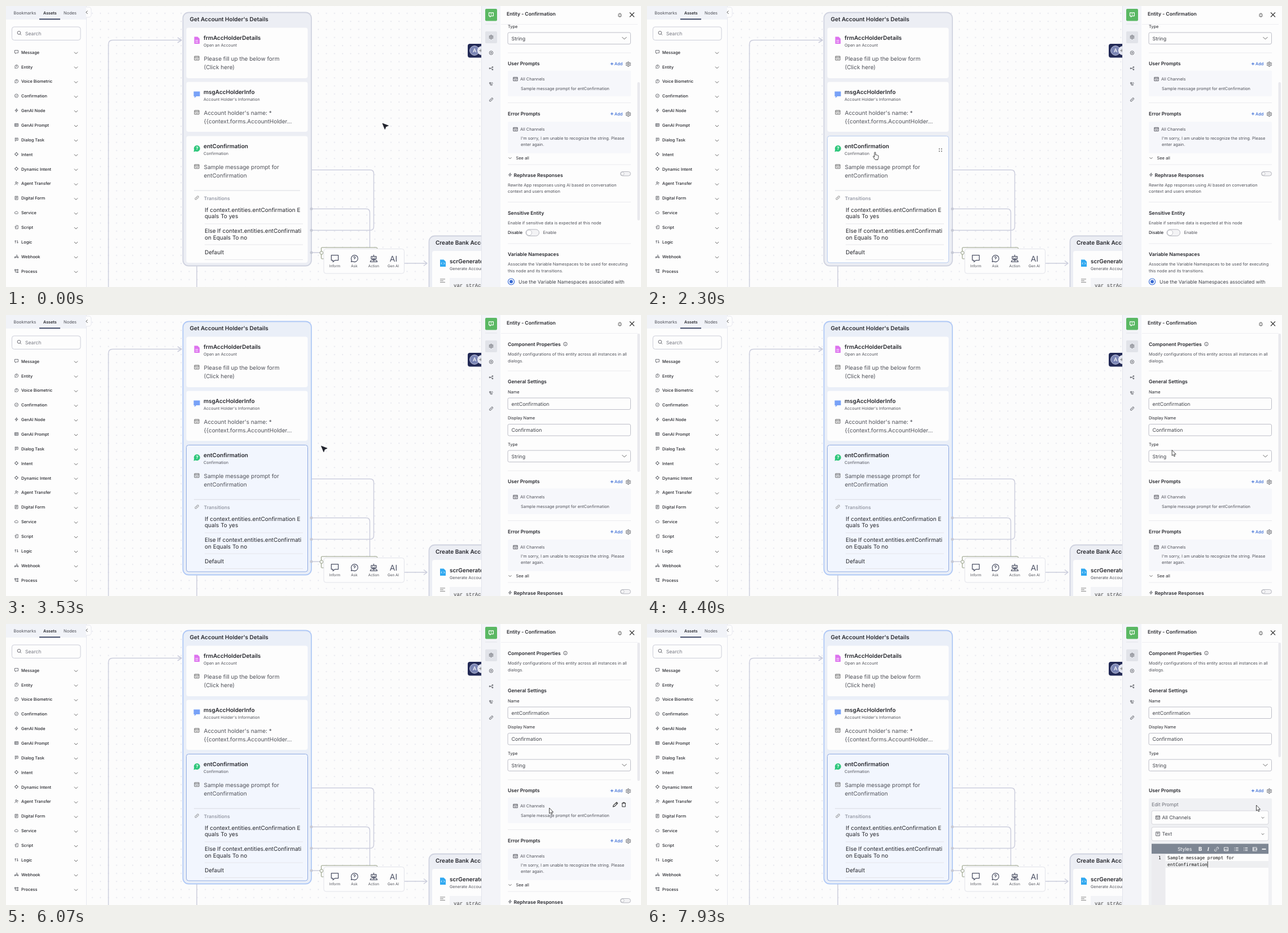
These frames come from a looping animation (1125 by 498 pixels, 8 s). An HTML page:

```html
<!DOCTYPE html>
<html lang="en">
<head>
<meta charset="utf-8">
<title>Entity confirmation</title>
<style>
html, body { margin: 0; width: 100%; height: 100%; overflow: hidden; background: #fdfdfd; }
svg { display: block; width: 100%; height: 100%; font-family: Inter, sans-serif; }
text { white-space: pre; text-rendering: geometricPrecision; }
</style>
</head>
<body>
<svg id="stage" viewBox="0 0 1125 498"></svg>
<script>
const INK = '#26272d', BODY = '#50525a', LINE = '#cccedd', BLUE = '#3568d4';

// Drawing helpers; text is placed by the middle of its capitals.
const text = (x, y, s, size = 7.4, weight = 400, fill = BODY, more = '') =>
  `<text x="${x}" y="${y + size * .36}" font-size="${size}" font-weight="${weight}" fill="${fill}" ${more}>${s}</text>`;
const rect = (x, y, w, h, fill, stroke = 'none', r = 0, more = '') =>
  `<rect x="${x}" y="${y}" width="${w}" height="${h}" rx="${r}" fill="${fill}" stroke="${stroke}" ${more}/>`;
const path = (d, stroke = INK, width = 1, fill = 'none', more = '') =>
  `<path d="${d}" stroke="${stroke}" stroke-width="${width}" fill="${fill}" stroke-linejoin="round" ${more}/>`;
const circle = (x, y, r, fill, stroke = 'none', width = 1) =>
  `<circle cx="${x}" cy="${y}" r="${r}" fill="${fill}" stroke="${stroke}" stroke-width="${width}"/>`;
const group = (x, y, inner, more = '') => `<g transform="translate(${x} ${y})" ${more}>${inner}</g>`;
const icon = (cx, cy, d, scale = 1, stroke = '#484a52', width = .85) =>
  `<g transform="translate(${cx - 4 * scale} ${cy - 4 * scale}) scale(${scale})">${path(d, stroke, width)}</g>`;
const chevron = (x, y, w = 3, color = '#555') => path(`M${x - w} ${y - w / 2}l${w} ${w} ${w} ${-w}`, color, .9);
const rule = (x, y, w, color = '#e2e2e7') => path(`M${x} ${y}h${w}`, color, .9);

// Icons in an 8 by 8 box
const I = {
  bubble: 'M.6.8h6.8v5H4L2.2 7.4V5.8H.6z',
  ask: 'M1 7.3l.4-1.7A3.3 3.3 0 1 1 2.7 6.9zM3.2 3a.9.9 0 1 1 .9 1v.7',
  check: 'M4 .6a3.4 3.4 0 1 1 0 6.8a3.4 3.4 0 0 1 0-6.8zM2.5 4l1 1 2-2',
  bolt: 'M4.6.5L1.2 4.5h2.6L3.4 7.5 6.8 3.5H4.2z',
  grid: 'M.6 1.2h6.8v5.6H.6zM.6 4h6.8M3 1.2v5.6M5 2.5h1M5 5.4h1',
  task: 'M1 1h6v4.6H3.6L1.6 7.2V1M3 2.6h2.5M3 4h1.6',
  target: 'M4 1.4a2.6 2.6 0 1 1 0 5.2a2.6 2.6 0 0 1 0-5.2zM4 0v2.2M4 5.8V8M0 4h2.2M5.8 4H8',
  gear: 'M4 2.7a1.3 1.3 0 1 1 0 2.6a1.3 1.3 0 0 1 0-2.6zM3.3.5h1.4l.3 1 1 .5 1-.3.7 1.2-.7.8v.8l.7.8-.7 1.2-1-.3-1 .5-.3 1H3.3L3 6.7l-1-.5-1 .3-.7-1.2.7-.8v-.8L.3 2.900 1 1.700l1 .3 1-.5z',
  person: 'M3.5.8a1.5 1.5 0 1 1 0 3a1.500 1.500 0 0 1 0-3zM.8 7.200c0-3 5-3 5.400 0M5.500 3.200h2M6.600 2.200v2',
  form: 'M1.200.7h5.600v6.600H1.200zM2.500 2.500h3M2.500 4h3M2.500 5.500h1.500',
  cloud: 'M2.200 6.300a1.800 1.800 0 0 1 0-3.600A2.200 2.200 0 0 1 6 3a1.700 1.700 0 0 1 0 3.300z',
  script: 'M2.500.8h4.500v6.400H2V5M.5 3.500h3M2.500 2l1.500 1.500L2.500 5',
  logic: 'M2 7V2M.7 3.300L2 1.500l1.300 1.800M4.500 2h1.700v4.500M4.800 5.200l1.400 1.500 1.300-1.500',
  hook: 'M4 .8a1.300 1.300 0 1 1-.1 2.700L2 6.200M4.600 3l1.600 2.600M.8 5.800h6.400M2 4.600A1.400 1.400 0 1 0 2 7.300M6 4.600a1.400 1.400 0 1 1 0 2.700',
  flow: 'M.7 1h2v2h-2zM5.300 1h2v2h-2zM5.300 5.300h2v2h-2zM2.700 2h2.600M1.700 3v3.300h3.600',
  plus: 'M4 .6a3.400 3.400 0 1 1 0 6.800a3.400 3.400 0 0 1 0-6.800zM4 2.500v3M2.500 4h3',
  share: 'M.6 3.200h1.600v1.600H.6zM5.800 1h1.600v1.600H5.800zM5.800 5.400h1.600V7H5.800zM2.200 4h1.500M5.800 1.800L3.700 4l2.100 2.200',
  loop: 'M1 1.500h2.500v2H1zM4.800 4.300a1.300 1.300 0 1 1 0 2.600a1.300 1.300 0 0 1 0-2.600zM5 1.500c2 0 2 1 1.700 2.200M2 4.500c0 1.500.4 1.800 1.500 1.600',
  plug: 'M2 6L.8 7.200M6 2L7.200.8M2.300 3.300l2.400 2.400-1 1a1.700 1.700 0 0 1-2.400-2.400zM3.400 2.300l1-1a1.700 1.700 0 0 1 2.400 2.400l-1 1z',
  prompt: 'M.5 1h7v6h-7zM.5 2.800h7M2 4.700h1l.6.7h1l.5-.7h1',
  info: 'M4 .8a3.200 3.200 0 1 1 0 6.400a3.200 3.200 0 0 1 0-6.400zM4 3.500v2M4 2.300v.5',
  search: 'M3.500.7a2.800 2.800 0 1 1 0 5.600a2.800 2.800 0 0 1 0-5.600zM5.500 5.500l2 2',
  bot: 'M1.500 2.200h5v2.300h-5zM4 2.200V.5M2.700 3.300h.6M4.800 3.300h.6M.6 7.600c0-3 6.800-3 6.800 0zM3 5.500l1 1 1-1',
  text: 'M.7.700h6.600v6.600H.7zM2.300 2.500h3.400M4 2.500v3.500',
  pencil: 'M.6 7.400l.6-2.200L6 .5l1.500 1.500-4.700 4.800zM5 1.500L6.500 3',
  trash: 'M.8 1.800h6.400M2.700 1.700V.6h2.600v1.100M1.500 1.800v5.700h5V1.800',
  link: 'M3 5l2-2M3.500 2l1-1a1.700 1.700 0 0 1 2.500 2.500l-1 1M4.500 6l-1 1A1.700 1.700 0 0 1 1 4.500l1-1',
  image: 'M.5 1h7v6h-7zM.7 6.500l2-2.500 1.500 1.500 1.200-1 2 2M5.500 2.700h.5',
  list: 'M3 1.500h4.700M3 4h4.700M3 6.500h4.700M.6 1.500h1M.6 4h1M.6 6.500h1',
  indent: 'M.5 1h7M.5 7h7M.5 3h3M.5 5h3M7.500 2.500L5 4l2.500 1.500zM.5.5v7'
};

const handle = Array.from({ length: 4 }, (_, i) =>
  rect(517 + i % 2 * 4, 252.500 + (i >> 1) * 4, 1.700, 1.700, '#666')).join('');

function sidebar() {
  const items = [['Message', 'bubble'], ['Entity', 'ask'], ['Voice Biometric', 'ask'], ['Confirmation', 'check'],
    ['GenAI Node', 'bolt'], ['GenAI Prompt', 'grid'], ['Dialog Task', 'task'], ['Intent', 'target'],
    ['Dynamic Intent', 'target'], ['Agent Transfer', 'person'], ['Digital Form', 'form'], ['Service', 'cloud'],
    ['Script', 'script'], ['Logic', 'logic'], ['Webhook', 'hook'], ['Process', 'flow']];
  return rect(0, 0, 142, 498, '#fdfdfd') + rect(0, 0, 142, 24, '#f1f3f8') + path('M142.500 0V498', '#e7e8ef') +
    path('M142 2h4q5 0 5 5v8q0 5-5 5h-4', '#e7e8ef', 1, '#fdfdfd') +
    path('M144.500 8.500l-2.700 2.700 2.700 2.700', '#555') +
    text(13.500, 12, 'Bookmarks', 7.500) + text(66, 12, 'Assets', 7.200, 600, INK) + text(102, 12, 'Nodes', 7.500) +
    rect(59, 22.500, 37, 1.700, '#253052') +
    rect(10.500, 37, 121.500, 23.500, '#fdfdfd', '#cbcdd8', 4) +
    icon(23.500, 48, I.search) + text(34, 48.500, 'Search', 8.600, 400, '#777983') +
    items.map(([name, key], i) => {
      const y = 82 + i * 25.870;
      return icon(18.500, y - .5, I[key], .9) + text(27, y, name, 7.400, 500, INK) + chevron(124, y + 1.200);
    }).join('');
}

function node() {
  const head = (y, name, sub) => text(350, y, name, 10, 600, INK) + text(350, y + 13.300, sub, 7.200);
  const lines = (y, a, b) => icon(338, y - .5, I.prompt, 1.150, '#666') +
    text(350.500, y, a, 10) + text(350.500, y + 15, b, 10);
  const cond = (y, a, b) => text(352, y, a, 10, 400, INK) + text(352, y + 11.500, b, 10, 400, INK);
  return rect(313.500, 11.500, 227.500, 449, '#eceef4', '#d0d3e0', 10, 'id="shell" stroke-width="1.800"') +
    text(325.500, 23.500, "Get Account Holder's Details", 10, 600, INK) +
    rect(319.500, 38.500, 215, 89.500, '#fdfdfd', 'none', 4) + rect(319.500, 134.500, 215, 88.500, '#fdfdfd', 'none', 4) +
    rect(319.500, 230.500, 215, 224.500, '#fdfdfd', 'none', 4, 'id="card"') +
    head(56.500, 'frmAccHolderDetails', 'Open an Account') +
    path('M333.500 54.500h6l3.500 3.500v9h-9.500z', 'none', 1, '#dd72ee') + path('M335.500 61h5M335.500 64h5', '#fff') +
    lines(93, 'Please fill up the below form', '(Click here)') +
    head(152.500, 'msgAccHolderInfo', "Account Holder's Information") +
    path('M332.500 151.500h11v8.500h-6.500l-3 3v-3h-1.500z', 'none', 1, '#78a2f7') +
    lines(189, "Account holder's name: *", '{{context.forms.AccountHolder...') +
    head(248, 'entConfirmation', 'Confirmation') +
    path('M338.500 247a5.500 5.500 0 1 1-2.500 10.500l-3.500 1 .8-4A5.500 5.500 0 0 1 338.500 247z', 'none', 1, '#2fc77c') +
    text(336.300, 252.600, '?', 8, 700, '#fff') +
    lines(285, 'Sample message prompt for', 'entConfirmation') +
    rule(333, 327, 188, '#d5d6dd') + icon(338, 340, I.plug, 1, '#777') +
    text(350.500, 340.500, 'Transitions', 8.600, 600, '#969aa6') +
    cond(361, 'If context.entities.entConfirmation E', 'quals To yes') + rule(352, 386, 174) +
    cond(398.500, 'Else If context.entities.entConfirmati', 'on Equals To no') + rule(352, 423, 174) +
    text(352, 436.500, 'Default', 10, 400, INK) + rule(352, 449.500, 174) +
    `<g id="handle">${handle}</g>`;
}

function canvas() {
  const tool = (x, name, art) => art + text(x, 461, name, 6.400, 400, BODY, 'text-anchor="middle"');
  const wire = d => path(d, LINE, 1.500);
  return rect(142, 0, 700, 498, '#fcfcfc') + rect(142, 0, 700, 498, 'url(#dots)') +
    wire('M181.500 498V68q0-7.500 7.500-7.500H311M304 56l7 4.500-7 4.500') + wire('M338 460V498') +
    wire('M541 290.500H645q6.500 0 6.500 6.500V391q0 6.500-6.500 6.500H541') +
    wire('M541 359.500H638q6.500 0 6.500 6.500V430') + wire('M541 437H557') +
    wire('M706 456H746M740 451.500l6 4.500-6 4.500') + node() +
    [359.500, 397.500, 437].map(y => circle(541, y, 2.500, '#c6c9d5')).join('') +
    rect(558.500, 428, 99, 20, '#fdfdfd', '#8f997e', 1) + circle(559, 437.500, 2.800, '#fff', '#8f997e') +
    rect(563, 430.500, 142.500, 43.500, '#fdfdfd', '#e2e3ea', 4) +
    tool(582.500, 'Inform', icon(582.500, 447.500, I.bubble, 1.800, '#4c5165', .7)) +
    tool(617, 'Ask', icon(617, 447.500, I.ask, 1.800, '#4c5165', .7)) +
    tool(651.500, 'Action', icon(651.500, 447, I.bot, 1.800, '#4c5165', .7)) +
    tool(686, 'Gen AI', text(686.500, 447.500, 'AI', 14, 400, '#4c5165', 'text-anchor="middle"')) +
    rect(749.500, 407.500, 150, 120, '#eceef4', '#d0d3e0', 10, 'stroke-width="1.800"') +
    text(761, 419.500, 'Create Bank Account', 10, 600, INK) + rect(755, 434, 140, 90, '#fdfdfd', 'none', 4) +
    path('M769 449.500h6.500l3.500 3.500v9h-10z', 'none', 1, '#2fa8f0') +
    path('M772.500 454.500l-1.500 1.700 1.500 1.700M775.500 454.500l1.500 1.700-1.500 1.700', '#fff', .9) +
    text(786, 452.500, 'scrGenerateAccount', 10, 600, INK) + text(786, 465, 'Generate Account', 7.200) +
    path('M769 484h9M769 486.800h6M769 489.600h9', '#777', .9) +
    rect(786, 482, 100, 30, '#f3f4f7') +
    text(793, 495, 'var strAcc', 9, 400, '#444', 'font-family="Liberation Mono, monospace"') +
    rect(818, 67, 40, 24.500, '#232a56', 'none', 4) + circle(830, 79, 8.300, '#7c86b5', '#c6cbe4') +
    text(827, 79, 'A', 9, 500, '#fff') + circle(843, 79, 8, '#e6e8f2') + path('M838 79h5M841 76.500v5', '#777');
}

const SEP = y => rule(889, y, 218, '#e8e8ed');
const title = (y, s, x = 889) => text(x, y, s, 8.600, 600, INK);
const toggle = (x, y, w, h) => rect(x, y, w, h, '#f3f3f5', '#b5b6be', h / 2) + circle(x + h / 2, y + h / 2, h / 2 - 1, '#fff', '#b5b6be', .8);
const channel = y => icon(902.500, y, I.prompt, 1.050) + text(911, y + .3, 'All Channels', 7.400);
const promptHead = (y, s) => title(y, s) + path(`M1071 ${y + .5}h5M1073.500 ${y - 2}v5`, BLUE) +
  text(1078, y + .5, 'Add', 7.400, 500, BLUE) + icon(1102.500, y + 1, I.gear, 1.100);

function fields() {
  const field = (y, label, value) => text(889, y, label, 7.400, 400, INK) +
    rect(889, y + 11, 217.500, 20.500, '#fdfdfd', '#bdbec8', 2.500) + text(895.500, y + 21.500, value, 8.800, 400, '#3f4148');
  return title(52, 'Component Properties') + icon(991, 51.500, I.info) +
    text(889, 69.500, 'Modify configurations of this entity across all instances in all') + text(889, 81, 'dialogs.') +
    SEP(99) + title(118, 'General Settings') + field(136, 'Name', 'entConfirmation') +
    field(182.500, 'Display Name', 'Confirmation') + field(229, 'Type', 'String') + chevron(1095.500, 250, 4) +
    SEP(276) + promptHead(295, 'User Prompts');
}

function prompts() {
  return rect(889, 307.500, 218, 45.500, '#f6f7fb', 'none', 2) + channel(322.500) +
    text(912, 339, 'Sample message prompt for entConfirmation') +
    `<g id="tools">${icon(1079.500, 320, I.pencil, 1.200, '#222')}${icon(1094.500, 320, I.trash, 1.100, '#222')}</g>` +
    SEP(364.500) + promptHead(383.500, 'Error Prompts') +
    rect(889, 398, 218, 56, '#f6f7fb', 'none', 2) + channel(411.500) +
    text(912, 427.500, "I'm sorry, I am unable to recognize the string. Please") + text(912, 438.500, 'enter again.') +
    chevron(893, 462.500, 2.500) + text(903.500, 462.500, 'See all', 7.400, 400, INK) + SEP(474) +
    icon(893, 492, I.bolt, .9) + title(492.500, 'Rephrase Responses', 899.500) + toggle(1088.500, 486.500, 18, 7.500) +
    text(889, 510, 'Rewrite App responses using AI based on conversation') + text(889, 521, 'context and users emotion') +
    SEP(540.500) + title(559.500, 'Sensitive Entity') + text(889, 577, 'Enable if sensitive data is expected at this node') +
    text(889, 594.500, 'Disable', 7.400, 500, INK) + toggle(921, 589, 23.500, 11.500) + text(951.500, 594.500, 'Enable') +
    SEP(614) + title(633, 'Variable Namespaces') +
    text(889, 650.500, 'Associate the Variable Namespaces to be used for executing') + text(889, 662, 'this node and its transitions.') +
    circle(895, 681.500, 5.500, '#fff', BLUE, 1.200) + circle(895, 681.500, 3, BLUE) +
    text(908, 681.500, 'Use the Variable Namespaces associated with', 8.600, 400, '#3f4148');
}

function editor() {
  const select = (y, key, s) => rect(894, y - 12, 207, 24, '#fdfdfd', '#d5d6dc', 3) +
    icon(905, y, I[key], 1) + text(912.500, y, s, 8.700, 400, '#3f4148') + chevron(1091, y + .3, 2.300);
  const code = (x, y, s) => text(x, y, s, 7.850, 400, '#111', 'font-family="DejaVu Sans Mono, monospace"');
  const bar = [['link', 1009], ['image', 1026], ['list', 1044], ['list', 1060.500], ['indent', 1077]];
  return rect(889, 309, 218, 200, '#f0f1f4', 'none', 2) + text(894, 319.500, 'Edit Prompt', 8.700, 400, '#6a6c75') +
    select(343, 'prompt', 'All Channels') + select(372, 'text', 'Text') +
    rect(894, 389.500, 207, 18, '#7d8693') + text(940, 398.500, 'Styles', 8.700, 400, '#fff') +
    text(977, 399, 'B', 9.500, 700, '#fff') + text(992.500, 399, 'I', 9.500, 600, '#fff', 'font-style="italic" font-family="Liberation Serif, serif"') +
    bar.map(([key, x]) => icon(x, 399, I[key], 1, '#fff', .9)).join('') + path('M1089.500 399h7', '#fff', 1.700) +
    rect(894, 407.500, 207, 91, '#fdfdfd') + rect(894, 407.500, 24.500, 91, '#ececef') +
    rect(918.500, 420, 182.500, 12, '#eeeff1') + code(906, 414, '1') +
    code(922, 414, 'Sample message prompt for') + code(922, 426, 'entConfirmation') +
    path('M993.300 420.500v11', '#222', .9);
}

function panel() {
  const side = [['gear', 55], ['plus', 83], ['share', 110.500], ['loop', 138], ['plug', 166]];
  return rect(842, 0, 34.500, 498, '#f3f4f8') + path('M842.500 0V498', '#e2e4ec') + rect(876, 0, 249, 498, '#fdfdfd') +
    rect(849, 5, 21, 21.500, '#5ab863', 'none', 2) + icon(859.500, 15.500, I.bubble, 1.150, '#fff', 1) +
    path('M859.500 13v2.500M859.500 16.500v.8', '#fff') + rule(849, 32, 21, '#dfe0e7') +
    rect(849, 45, 21, 21, '#e1e3e9', 'none', 2) + side.map(([key, y]) => icon(859.500, y, I[key], .95)).join('') +
    `<g clip-path="url(#body)"><g id="scroll">${fields()}<g id="prompts">${prompts()}</g><g id="editor">${editor()}</g></g></g>` +
    text(887, 13.500, 'Entity - Confirmation', 8.600, 600, INK) + rule(877, 32.500, 242, '#ededf1') +
    path('M1084 15h2.500v-2.500M1091 15h-2.500v-2.500M1084 17.500h2.500v2.500M1091 17.500h-2.500v2.500', '#444', .9) +
    path('M1105 11.500l8 8M1113 11.500l-8 8', '#333', 1.100) +
    rect(1118.500, 33, 4.500, 245, '#e9e9ed', 'none', 2, 'id="thumb"');
}

const cursors =
  path('M0 0L10.500 4 6 6 4.300 10.500z', '#20222c', .8, '#20222c', 'id="arrow"') +
  path('M2 7.500V1.200q0-1.200 1-1.200t1 1.200V5q1-.8 1.800.2 1-.5 1.600.5 1.600-.3 1.600 1.300v2.500q0 1.500-1 2.500v1.500H3.500L1.500 11 0 8.500q-.8-1.500.4-1.600T2 8.500z', '#333', .9, '#fff', 'id="hand"') +
  path('M0 0V10L2.300 8 3.800 11.400 5.400 10.700 4 7.400H7z', '#333', .9, '#fff', 'id="pointer"');

document.getElementById('stage').innerHTML =
  `<defs><pattern id="dots" x="146" y="6" width="14.300" height="14.300" patternUnits="userSpaceOnUse">${circle(7, 7, 1, '#dfe0ea')}</pattern>
  <clipPath id="body"><rect x="876" y="32" width="242" height="466"/></clipPath></defs>` +
  canvas() + sidebar() + panel() + `<g id="cursor">${cursors}</g>`;

const el = Object.fromEntries([...document.querySelectorAll('#stage [id]')].map(n => [n.id, n]));
const show = (n, on) => n.setAttribute('visibility', on ? 'inherit' : 'hidden');
const set = (n, attrs) => Object.entries(attrs).forEach(([k, v]) => n.setAttribute(k, v));
const clamp = v => Math.max(0, Math.min(1, v));
const mix = (a, b, k) => `rgb(${a.map((v, i) => Math.round(v + (b[i] - v) * k))})`;

// Cursor stops: time, x, y
const stops = [[0, 667, 208], [30, 667, 208], [830, 410, 265], [1200, 401, 259], [3430, 401, 259], [3700, 901, 174],
  [4270, 901, 174], [4400, 930, 239], [4700, 956, 314], [5070, 962, 326], [6040, 962, 326], [6800, 1079.500, 321], [8000, 1079.500, 321]];

function slope(i, axis) {
  const [a, b, c] = [stops[i - 1], stops[i], stops[i + 1]];
  if (!a || !c || a[axis] === b[axis] || b[axis] === c[axis]) return 0;
  return (c[axis] - a[axis]) / (c[0] - a[0]);
}

function cursorAt(t) {
  const i = Math.max(0, stops.findIndex(s => s[0] > t) - 1);
  const a = stops[i], b = stops[i + 1], d = b[0] - a[0], u = (t - a[0]) / d;
  return [1, 2].map(k => {
    const s = u * u * (3 - 2 * u);
    return a[k] + (b[k] - a[k]) * s + d * u * (1 - u) * ((1 - u) * slope(i, k) - u * slope(i + 1, k));
  });
}

const SELECT = 2330, RELOAD = 2430, EDIT = 7300;

function draw(t) {
  const [x, y] = cursorAt(t);
  const onCard = x > 319 && x < 535 && y > 230 && y < 455;
  const onPanel = x > 842;
  const onPrompt = x > 889 && x < 1107 && y > 307 && y < 353;
  const sel = clamp((t - SELECT) / 150), fresh = t >= RELOAD, editing = t >= EDIT;

  set(el.cursor, { transform: `translate(${x} ${y})` });
  show(el.hand, onCard);
  show(el.pointer, onPanel);
  show(el.arrow, !onCard && !onPanel);

  set(el.shell, { fill: mix([236, 238, 244], [234, 239, 248], sel), stroke: mix([208, 211, 224], [176, 201, 246], sel) });
  set(el.card, {
    fill: mix([253, 253, 253], [242, 246, 254], sel),
    stroke: onCard || sel ? mix([184, 204, 240], [142, 170, 226], sel) : 'none'
  });
  show(el.handle, onCard);

  set(el.scroll, { transform: `translate(0 ${fresh ? 0 : -193})` });
  set(el.thumb, { y: fresh ? 33 : 135, height: editing ? 203 : 245 });
  show(el.prompts, !editing);
  show(el.editor, editing);
  show(el.tools, onPrompt && fresh && !editing);
}

const start = performance.now();
function tick() {
  draw((performance.now() - start) % 8000);
  requestAnimationFrame(tick);
}
tick();
</script>
</body>
</html>
```
